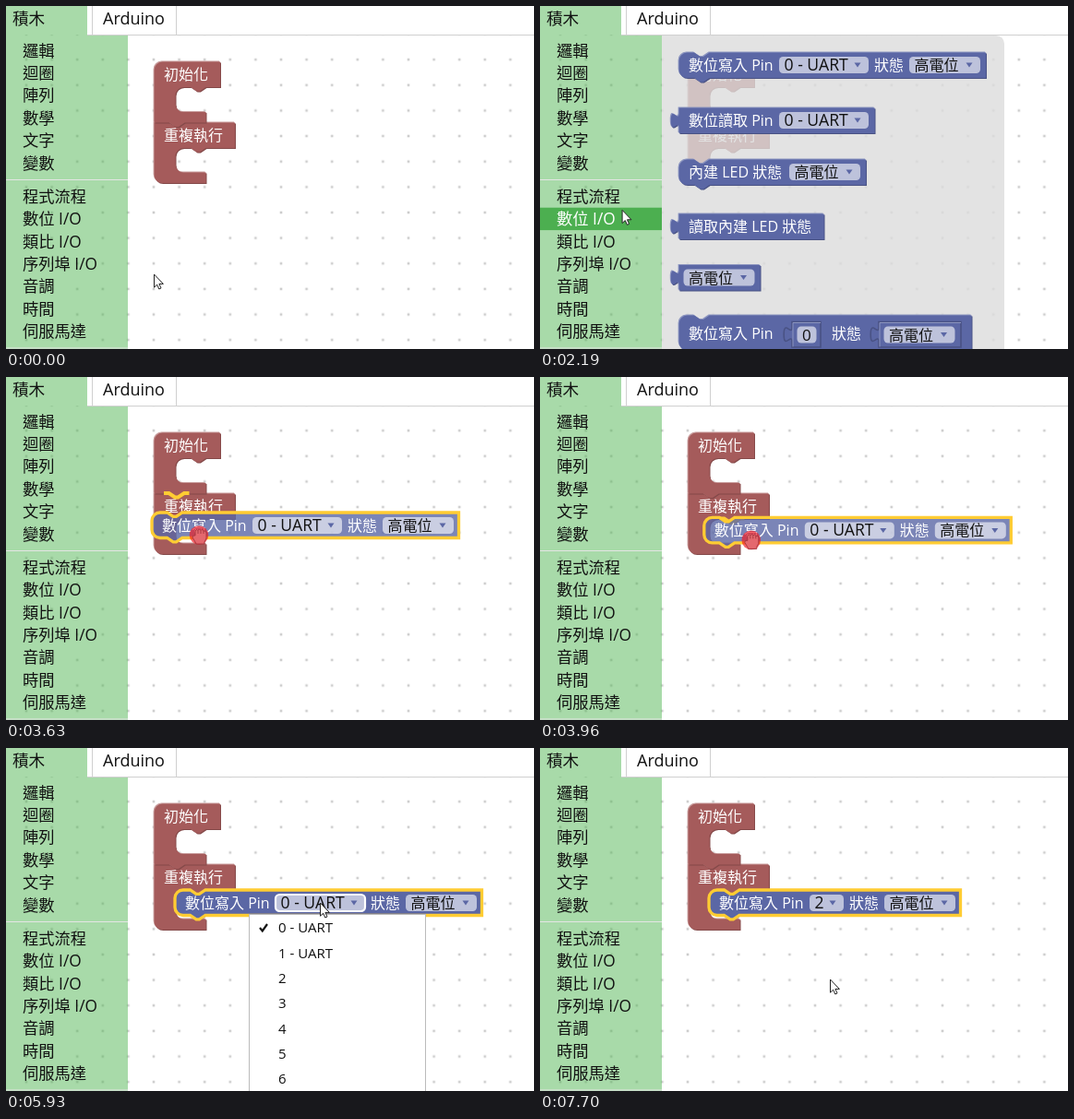
These frames come from a looping animation (572 px wide and 372 px high, 8 s). An HTML page:

```html
<!DOCTYPE html>
<html lang="zh-Hant">
<head>
<meta charset="utf-8">
<title>積木</title>
<style>
html, body { margin: 0; width: 100%; height: 100%; overflow: hidden; background: #fff; }
svg { display: block; font-family: "Open Sans", "Noto Sans CJK TC", "Noto Sans CJK", sans-serif; }
text { white-space: pre; }
.thin { font-weight: 300; }
.thin tspan { font-weight: 400; }
</style>
</head>
<body>
<svg id="stage" width="572" height="372" viewBox="0 0 572 372"></svg>
<script>
const LOOP = 8000;
const RED = { main: '#a55b5b', light: '#c79a9a', dark: '#844949' };
const BLUE = { main: '#5b67a5', light: '#8c95c0', dark: '#495284' };
const YELLOW = '#fc3';
const GREEN = '#52b654';

// start, end, steps, target x, target y, steady speed
const MOVES = [
  [430, 870, 5, 82, 230],
  [2190, 2870, 7, 201, 74],
  [3310, 3630, 4, 209, 171, true],
  [3740, 4170, 5, 242, 180, true],
  [4820, 5380, 6, 340, 168],
  [6480, 7160, 7, 314, 251]
];
const PRESSES = [[1090, 1310], [3070, 4510], [5710, 5930], [7380, 7700]];
const T = { open: 1640, drag: 3310, snap: 4290, release: 4510, menu: 5930, pick: 7600 };

const ROWS = ['邏輯', '迴圈', '陣列', '數學', '文字', '變數', '程式流程',
  '數位 I/O', '類比 I/O', '序列埠 I/O', '音調', '時間', '伺服馬達']
  .map((name, i) => ({ name, y: (i < 6 ? 48.5 : 60.3) + i * 24.4 }));

const within = (t, a, b) => t >= a && t < b;
const inside = ([px, py], x, y, w, h) => px >= x && px < x + w && py >= y && py < y + h;
const group = (x, y, body) => `<g transform="translate(${x} ${y})">${body}</g>`;
const rect = (x, y, w, h, fill, more = '') =>
  `<rect x="${x}" y="${y}" width="${w}" height="${h}" fill="${fill}" ${more}/>`;
const path = (d, more) => `<path d="${d}" ${more}/>`;
const text = (x, y, s, size, fill, cls = '') =>
  `<text x="${x}" y="${y}" font-size="${size}" fill="${fill}" class="${cls}">` +
  s.replace(/[ -~]+/g, '<tspan>$&</tspan>') + '</text>';

// Block outlines
const NOTCH = 'l6.6 4.4h3.3l6.6 -4.4';
const NOTCH_BACK = 'l-6.6 4.4h-3.3l-6.6 -4.4';
const stack = (w, h = 27.5) =>
  `M0 8.8A8.8 8.8 0 0 1 8.8 0H16.5${NOTCH}H${w}V${h}H33${NOTCH_BACK}H8.8A8.8 8.8 0 0 1 0 ${h - 8.8}Z`;
const output = w =>
  `M0 0H${w}V27.5H0V22c0 -11 -8.8 8.8 -8.8 -8.25s8.8 2.75 8.8 -8.25Z`;
function clamp(w, gap, first) {
  const low = 27.5 + gap, end = low + 11.5;
  const top = first ? 'M0 8.8A8.8 8.8 0 0 1 8.8 0' : `M0 0H16.5${NOTCH}`;
  const base = first ? `H33${NOTCH_BACK}H0Z` : `H8.8A8.8 8.8 0 0 1 0 ${end - 8.8}Z`;
  return `${top}H${w}V27.5H56${NOTCH_BACK}H31.8A8.8 8.8 0 0 0 23 36.3V${low - 8.8}` +
    `A8.8 8.8 0 0 0 31.8 ${low}H56V${end}${base}`;
}

function shape(d, c, selected, dragged) {
  const at = n => `transform="translate(${n} ${n})"`;
  const body = path(d, `fill="${c.main}" ${dragged ? 'fill-opacity=".8"' : ''}`);
  if (dragged || selected) {
    return (dragged ? '' : path(d, `fill="${c.dark}" ${at(1.1)}`)) + body +
      path(d, `fill="none" stroke="${YELLOW}" stroke-width="3.3"`);
  }
  return path(d, `fill="${c.dark}" ${at(1.5)}`) + path(d, `fill="${c.light}" ${at(-.4)}`) +
    path(d, `fill="${c.main}" ${at(.6)}`);
}

const label = (x, s, y = 19.6) => text(x, y, s, 16, '#fff');
function field(x, s, w, hover) {
  const size = /^[ -~]/.test(s) ? 17.6 : 16;
  return rect(x, 5, w, 18, '#fff', `rx="4.4" fill-opacity=".6" ${hover ? 'stroke="#fff" stroke-width="2.2"' : ''}`) +
    text(x + 5.5, 20, s, size, '#111', 'thin') +
    path(`M${x + w - 15.5} 11.5h7l-3.5 5z`, `fill="${BLUE.main}"`);
}
const level = x => field(x, '高電位', 77);

function writeBlock(pin, selected, dragged, hover) {
  const w = pin === '2' ? 37 : 97;
  return shape(stack(w + 235.5), BLUE, selected, dragged) + label(11, '數位寫入 Pin') +
    field(109, pin, w, hover) + label(w + 115, '狀態') + level(w + 153);
}

const socket = (w, inner) =>
  path(output(w), `fill="${BLUE.main}" stroke="${BLUE.dark}" stroke-width="1.6"`) +
  path(`M1 27V1H${w}`, `fill="none" stroke="${BLUE.light}"`) + inner;

// y, width, drawing
const PALETTE = [
  [50, 332.5, on => writeBlock('0 - UART', on)],
  [110, 212, on => shape(output(212), BLUE, on) + label(11, '數位讀取 Pin') + field(109, '0 - UART', 97)],
  [166, 202.5, on => shape(stack(202.5), BLUE, on) + label(11, '內建 LED 狀態') + level(120)],
  [225, 157, on => shape(output(157), BLUE, on) + label(11, '讀取內建 LED 狀態')],
  [280.5, 88, on => shape(output(88), BLUE, on) + level(5.5)],
  [335, 317, on => shape(stack(317, 38), BLUE, on) + label(11, '數位寫入 Pin', 25.5) +
    group(123, 7.5, socket(31, rect(5.5, 5, 21, 18, '#fff', 'rx="4.4" fill-opacity=".6"') +
      text(11, 20, '0', 17, '#111'))) +
    label(166, '狀態', 25.5) + group(217, 7.5, socket(89, level(5.5)))]
];

function pointer(t) {
  let p = [160, 291];
  for (const [t0, t1, n, x, y, steady] of MOVES) {
    if (t < t0) break;
    const gap = (t1 - t0) / (n - 1);
    const u = Math.min(n, Math.floor((t - t0) / gap + 1e-6) + 1) / n;
    const k = steady ? u : u * u * (3 - 2 * u);
    p = [p[0] + (x - p[0]) * k, p[1] + (y - p[1]) * k];
  }
  return p;
}

function tabs() {
  return rect(0, 0, 572, 31, '#fff') + rect(0, 0, 88, 31, GREEN, 'opacity=".5"') +
    path('M88 31.5H572M93.5 0V31M184.5 0V31', 'stroke="#d0d0d0" fill="none"') +
    text(7, 20, '積木', 17.6, '#111', 'thin') + text(105, 20, 'Arduino', 18, '#111');
}

function sidebar(t, p) {
  const open = within(t, T.open, T.drag);
  const free = !within(t, T.drag, T.release);
  let s = rect(0, 31, 132, 341, GREEN, 'opacity=".5"') +
    path('M0 188.5H132M0 371H132', 'stroke="#e5e5e5"');
  ROWS.forEach(({ name, y }, i) => {
    const chosen = open && i === 7;
    if (chosen) s += rect(0, y - 12.4, 132, 24.4, '#4caf50');
    else if (free && inside(p, 0, y - 12.4, 132, 24.4)) s += rect(0, y - 12.4, 132, 24.4, '#e5e5e5');
    s += text(18, y + 6, name, 17.3, chosen ? '#fff' : '#111', chosen ? '' : 'thin');
  });
  return s;
}

function flyout(p) {
  return path('M132 32H494.2A8.8 8.8 0 0 1 503 40.8V372H132Z', 'fill="#ddd" fill-opacity=".8"') +
    PALETTE.map(([y, w, draw]) => group(150, y, draw(inside(p, 150, y, w, 27.5)))).join('');
}

// Yellow mark on the joint nearest to the carried block
function joint(x, y) {
  const joints = [[183, 87.5], [160, 126], [183, 153.5]];
  const far = ([a, b]) => Math.hypot(a - x, b - y);
  const [a, b] = joints.sort((m, n) => far(m) - far(n))[0];
  return path(`M${a + 11} ${b}h5.5${NOTCH}h5.5`, `fill="none" stroke="${YELLOW}" stroke-width="4"`);
}

function menu(p) {
  const items = ['0 - UART', '1 - UART', '2', '3', '4', '5', '6'];
  return rect(263.5, 180.5, 191, 200, '#fff', 'stroke="#bbb"') +
    items.map((s, i) => {
      const y = 181.3 + i * 27.3;
      const on = inside(p, 263, y, 192, 27.3);
      return (on ? rect(264, y, 190, 27.3, '#d6e9f8') : '') + text(295, y + 19, s, 15, '#111');
    }).join('') +
    path('M275 195l2.8 3.5l5.2 -7.5', 'fill="none" stroke="#111" stroke-width="2.2"');
}

function cursor(t, [x, y]) {
  const pressed = PRESSES.some(([a, b]) => within(t, a, b));
  const line = 'stroke="#222" stroke-linejoin="round"';
  const arrow = path('M.5 0V14.2L3.7 11.2L5.8 16L8 15L5.9 10.4H10.4Z', `fill="#fff" ${line}`);
  const fist = path('M-4 8L-7 3Q-7 0 -4 1V-4Q-2.5 -6.5 -1 -4.5Q.5 -7 2 -4.5Q3.5 -6.5 5 -4Q7.5 -5 8 -2V4L6 8V10H-3Z' +
    'M-1 -4V-1M2 -4V-1M5 -4V-1', 'fill="#e4686e" stroke="#a3343d" stroke-width=".9"');
  return group(x, y, (pressed ? '<circle r="10.3" cy=".5" fill="#f01c24" opacity=".68"/>' : '') +
    (within(t, T.drag, T.release) ? fist : arrow));
}

const GRID = '<defs><pattern id="grid" x="8.2" y="16.7" width="27.6" height="27.64" patternUnits="userSpaceOnUse">' +
  rect(12.5, 12.5, 2.6, 2.6, '#ccc') + '</pattern></defs>' + rect(0, 31, 572, 341, 'url(#grid)');

function scene(t) {
  const p = pointer(t);
  const placed = t >= T.snap;
  let s = GRID +
    group(160, 126, shape(clamp(87.5, placed ? 31.5 : 26.5), RED) + label(11, '重複執行')) +
    group(160, 60, shape(clamp(71.5, 27, true), RED) + label(11, '初始化'));
  if (placed) {
    const pin = t >= T.pick ? '2' : '0 - UART';
    const hover = inside(p, 292, 158.5, pin === '2' ? 37 : 97, 18);
    s += group(183, 154, writeBlock(pin, true, false, hover));
  }
  if (within(t, T.open, T.drag)) s += flyout(p);
  s += sidebar(t, p) + tabs();
  if (within(t, T.drag, T.snap)) {
    const x = p[0] - 51, y = p[1] - 24;
    s += joint(x, y) + group(x, y, writeBlock('0 - UART', true, true));
  }
  if (within(t, T.menu, T.pick)) s += menu(p);
  return s + cursor(t, p);
}

const stage = document.getElementById('stage');
const start = performance.now();
let shown = '';
function tick() {
  const next = scene((performance.now() - start) % LOOP);
  if (next !== shown) stage.innerHTML = shown = next;
  requestAnimationFrame(tick);
}
tick();
</script>
</body>
</html>
```
